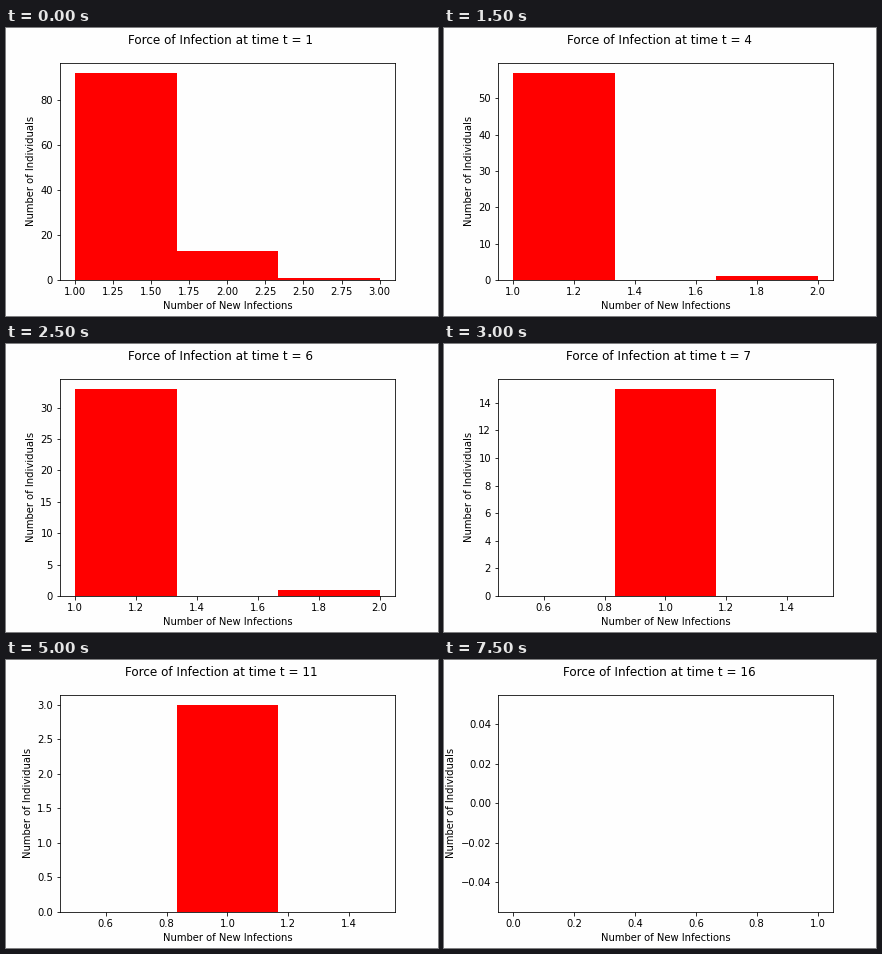
A matplotlib script for the animation above (8 s loop, 432 by 288 pixels).

```python
import matplotlib.pyplot as plt
import numpy as np
from matplotlib.animation import FuncAnimation

STEPS = 16
PAPER = "#fefefe"
# Key points of the outbreak: time and individuals with one new infection
KEY_T = [1, 2, 6, 7, 8, 9, 11, 14]
KEY_N = [92, 98, 33, 15, 9, 11, 3, 1.2]

plt.rcParams.update({
    "font.family": "DejaVu Sans",
    "figure.facecolor": PAPER,
    "axes.facecolor": PAPER,
})

fig, ax = plt.subplots(figsize=(6, 4), dpi=72)
fig.subplots_adjust(left=0.125, right=0.9, bottom=0.125, top=0.88)
title = fig.suptitle("", x=0.5 - 1 / 432, fontsize=12)


def spread(t):
    """Share of individuals who go on to infect one more person."""
    outbreak = 0.226 * np.exp(-((t - 1.66) ** 2) / 0.72)
    return outbreak + 0.026 + 0.007 * (-1) ** t


def infections(t):
    """New infections caused by each individual; none once the outbreak ends."""
    log_n = np.interp(t, KEY_T, np.log(KEY_N), right=-np.inf)
    counts = np.round(np.exp(log_n)) * spread(t) ** np.arange(4)
    return np.repeat(np.arange(1, 5), counts.astype(int))


def draw(step):
    t = step + 1
    data = infections(t)
    ax.clear()
    ax.hist(data, bins=3, color="red")
    if not data.size:
        ax.set_xlim(-0.05, 1.05)
        ax.set_ylim(-0.055, 0.055)
    ax.set_xlabel("Number of New Infections")
    ax.set_ylabel("Number of Individuals")
    title.set_text(f"Force of Infection at time t = {t}")
    return []


anim = FuncAnimation(fig, draw, frames=STEPS, init_func=lambda: draw(0),
                     interval=500, repeat=True, repeat_delay=0, blit=False)
plt.show()
```
